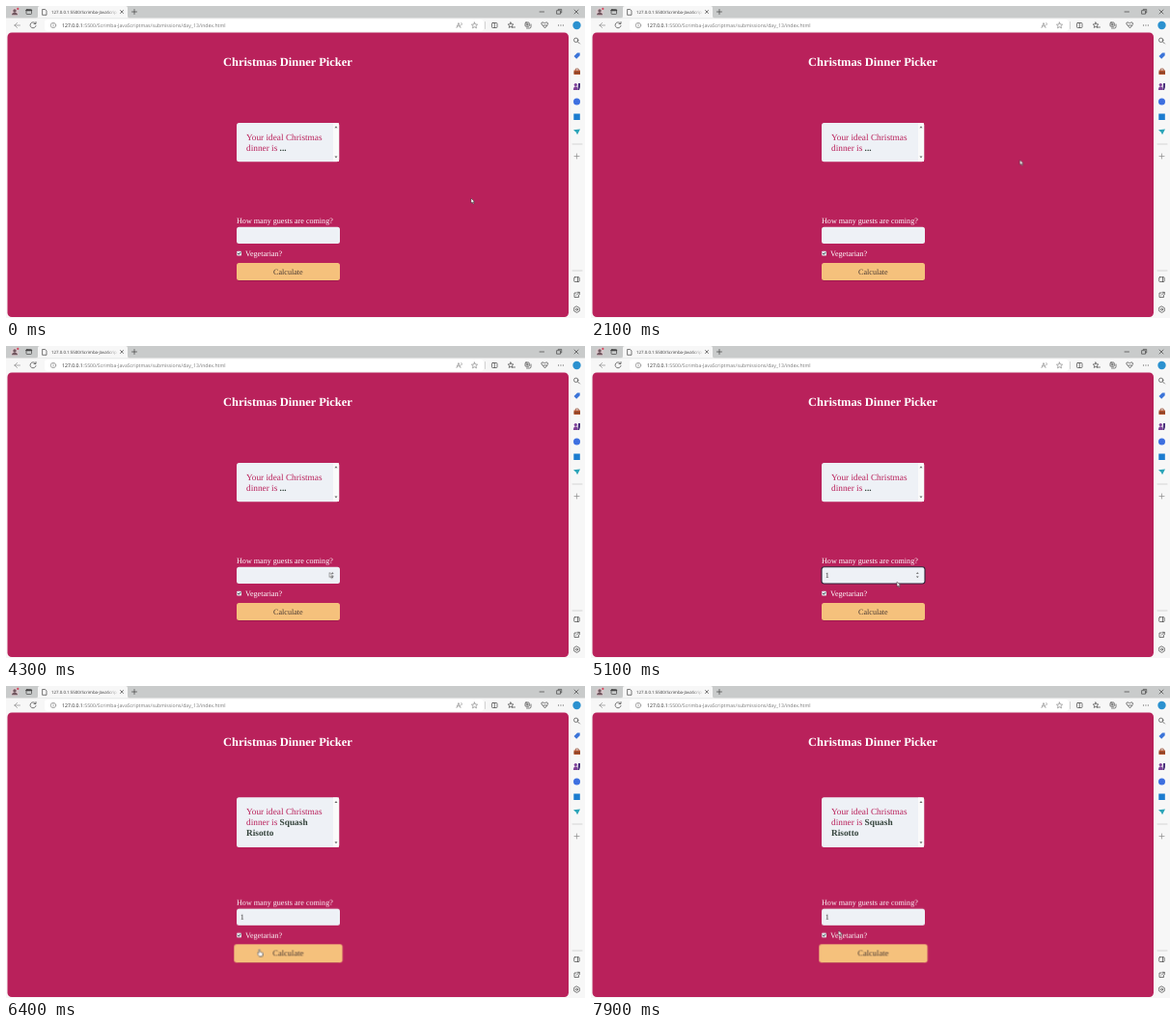
Write an HTML page that moves like this. It is 600 px wide and 323 px high and loops after 8000 ms.

```html
<!DOCTYPE html>
<html lang="en">
<head>
<meta charset="utf-8">
<title>Christmas Dinner Picker</title>
<style>
html, body { margin: 0; width: 100%; height: 100%; overflow: hidden; background: #f7f7f7; }
svg { display: block; width: 100vw; height: 100vh; text-rendering: geometricPrecision; }
.ui { font-family: "Open Sans", "Noto Sans", sans-serif; fill: #777; }
.serif { font-family: "Liberation Serif", "Times New Roman", serif; font-size: 8.1px; fill: #fff; }
.line { fill: none; stroke: #444; stroke-width: .7; stroke-linecap: round; stroke-linejoin: round; }
.soft { stroke: #8a8a8a; }
.pale { stroke: #c4c4c4; }
.answer { font-size: 9.3px; fill: #b9215b; }
.bold { font-weight: bold; fill: #34433b; }
.card { fill: #eef1f6; }
.anim { animation: 8s step-end infinite; }
.before { animation-name: before; }
.after { animation-name: after; }
.form { animation-name: form; }
.value { animation-name: value; }
.focus { animation-name: focus; }
.spin { animation-name: spin; }
.button { animation: hover 8s linear infinite; transform-box: fill-box; transform-origin: center; }
.pointer { animation: move 8s ease-in-out infinite; }
.arrow { animation-name: arrow; }
.hand { animation-name: hand; }
@keyframes before { 0% { opacity: 1 } 77.5%, 100% { opacity: 0 } }
@keyframes after { 0% { opacity: 0 } 77.5%, 100% { opacity: 1 } }
@keyframes form { 0% { transform: none } 77.5%, 100% { transform: translateY(1.8px) } }
@keyframes value { 0% { opacity: 0 } 58.75%, 100% { opacity: 1 } }
@keyframes focus { 0% { opacity: 0 } 58.75% { opacity: 1 } 77.5%, 100% { opacity: 0 } }
@keyframes spin { 0% { opacity: 0 } 47.5% { opacity: 1 } 77.5%, 100% { opacity: 0 } }
@keyframes hover { 0%, 66.25% { transform: scale(1) } 68.5%, 100% { transform: scale(1.05) } }
@keyframes arrow { 0% { opacity: 1 } 66.25% { opacity: 0 } 96.25%, 100% { opacity: 1 } }
@keyframes hand { 0% { opacity: 0 } 66.25% { opacity: 1 } 96.25%, 100% { opacity: 0 } }
@keyframes move {
  0% { transform: translate(482px, 199px) }
  15% { transform: translate(484px, 157px) }
  21% { transform: translate(484px, 157px) }
  37.5% { transform: translate(297.5px, 168px) }
  40% { transform: translate(297.5px, 168px) }
  50%, 61.25% { transform: translate(335.3px, 234.5px) }
  68.5%, 94% { transform: translate(262.5px, 272.5px) }
  98.5%, 100% { transform: translate(256.5px, 253px) }
}
</style>
</head>
<body>
<svg viewBox="0 0 600 323" preserveAspectRatio="none">
  <defs>
    <linearGradient id="fade" gradientUnits="userSpaceOnUse" x1="104" x2="116" y1="0" y2="0">
      <stop stop-color="#333"/><stop offset="1" stop-color="#333" stop-opacity="0.1"/>
    </linearGradient>
  </defs>

  <!-- browser frame -->
  <rect width="600" height="323" fill="#f7f7f7"/>
  <rect width="600" height="12.5" fill="#c9cbcb"/>
  <path d="M31 12.5q2 0 2-2V2q0-2 2-2H124q2 0 2 2v8.500q0 2 2 2z" fill="#f7f7f7"/>
  <rect x="40" y="14" width="455" height="12" rx="3" fill="#fff"/>
  <circle cx="9" cy="6.200" r="4.200" fill="#d9c9cd"/>
  <circle cx="9" cy="5" r="1.700" fill="#70565e"/>
  <path d="M6 9.300q0-2.500 3-2.500t3 2.500z" fill="#70565e"/>
  <circle cx="12.300" cy="2.900" r="1.100" fill="#d6455d"/>
  <g class="line">
    <rect x="21" y="3.500" width="5.500" height="5" rx=".8"/>
    <path d="M21 4.500h5.500" stroke-width="1.400"/>
    <path d="M38 3.500h2.600l1.400 1.400v4.400h-4z"/>
    <path d="M118.500 4.500l3 3m0-3l-3 3M130.500 6h5m-2.500-2.500v5"/>
    <path d="M553 6h4.500M571 4.700h3.500v3.500H571zM572.200 4v-.6h3.500V7h-.6M589 4l4 4m0-4l-4 4"/>
    <path d="M30.500 18a3 3 0 1 0 .5 2.500M31 16.500v2h-2"/>
    <path d="M9 20h5.500M9 20l2.500-2.500M9 20l2.500 2.500" class="soft"/>
    <path d="M572.500 20h.1m2.300 0h.1m2.300 0h.1" stroke-width="1"/>
  </g>
  <text class="ui" x="47" y="7.700" font-size="4.400" style="fill:url(#fade)">127.0.0.1:5500/Scrimba-JavaScrip</text>
  <g class="line soft">
    <circle cx="49" cy="20" r="2.700"/><path d="M49 19.700v1.500M49 18.500v.1"/>
    <path d="M485.500 17l.9 2 2.200.2-1.700 1.500.6 2.200-2-1.200-2 1.200.6-2.200-1.700-1.500 2.200-.2z"/>
    <path d="M467 22.500l2-5 2 5m-3.200-1.700h2.400M472 17.500q1 1 0 2.200"/>
    <path d="M496.500 16.500v7" class="pale"/>
  </g>
  <g class="line">
    <rect x="503.500" y="17.500" width="5.500" height="5" rx=".8"/><path d="M506.250 17.500v5"/>
    <path d="M523 17l.8 1.800 2 .2-1.500 1.400.5 2-1.800-1-1.800 1 .5-2-1.500-1.400 2-.2zM525 22h2.500"/>
    <rect x="538" y="17" width="4.300" height="4.300" rx="1"/><path d="M540.150 18v2.300M539 19.150h2.300M539.500 23h3q1.500 0 1.500-1.500V19"/>
    <path d="M560.500 20.500l-2 2.400-3.500-4q-.8-2 1.200-2 1.200 0 2 1.200.8-1.200 2-1.200 1.600 0 1.500 2M557 20h4"/>
  </g>
  <text class="ui" x="58" y="21.800" font-size="5.170"><tspan fill="#222">127.0.0.1</tspan>:5500/Scrimba-JavaScriptmas/submissions/day_13/index.html</text>

  <!-- side bar -->
  <circle cx="591.500" cy="20" r="4.200" fill="#2b91cf"/>
  <g class="line">
    <circle cx="590.700" cy="35.300" r="2.200"/><path d="M592.500 37l2 2"/>
  </g>
  <path d="M588.500 52l3.500-3.500h2.700v2.700l-3.500 3.500z" fill="#3b74d8"/>
  <path d="M588.500 66.500h6.500v4.500h-6.500z" fill="#b4532d"/>
  <path d="M590.300 66.500V65h2.900v1.500" class="line" style="stroke:#8d3b20"/>
  <path d="M588.500 69h6.500" stroke="#5e3025" stroke-width=".8"/>
  <circle cx="590.300" cy="81.500" r="1.600" fill="#7d3f98"/>
  <path d="M588 87q0-3.700 2.300-3.700t2.300 3.700z" fill="#7d3f98"/>
  <path d="M593 80h2v4l-1 3h-1.500z" fill="#4b327c"/>
  <circle cx="591.500" cy="99" r="3.500" fill="#3d6fe0"/>
  <rect x="588.300" y="111.500" width="6.500" height="6.500" fill="#1c7ccf"/>
  <path d="M588 128.300l7-.8-3 5.800-1.200-2.600z" fill="#2ba4b8"/>
  <path class="line pale" d="M587 143h10M587 274h10"/>
  <g class="line">
    <path d="M589 155.500h5m-2.500-2.500v5" class="soft"/>
    <rect x="588.700" y="280.700" width="5.500" height="4.800" rx=".8"/><path d="M592.500 280.700v4.800"/>
    <path d="M591 297h-2v4.500h4.500v-2M592 296.300h2.300v2.300M594 296.500l-2.800 2.800"/>
    <path d="M591.500 311l2.800 1.600v3.200l-2.800 1.600-2.800-1.600v-3.200z"/><circle cx="591.500" cy="314.200" r="1"/>
  </g>

  <!-- page -->
  <rect x="1.500" y="27.500" width="581.500" height="294.500" rx="4.500" fill="#b9215b"/>
  <g class="serif">
    <text x="292" y="62" text-anchor="middle" font-weight="bold" style="font-size:12.500px">Christmas Dinner Picker</text>

    <g class="anim before">
      <rect class="card" x="239" y="121" width="106.300" height="40.300" rx="2.500"/>
      <path d="M339 121.200h6v39.800h-6z" fill="#fafafa"/>
      <path d="M340.500 126.200l1.500-2 1.500 2zM340.500 155.500l1.500 2 1.500-2z" fill="#666"/>
      <text class="answer" x="249" y="138.700">Your ideal Christmas</text>
      <text class="answer" x="249" y="149.800">dinner is <tspan class="bold">...</tspan></text>
    </g>
    <g class="anim after">
      <rect class="card" x="239" y="115.300" width="106.300" height="51.700" rx="2.500"/>
      <path d="M339 115.500h6v51.200h-6z" fill="#fafafa"/>
      <path d="M340.500 121l1.500-2 1.500 2zM340.500 161.200l1.500 2 1.500-2z" fill="#666"/>
      <text class="answer" x="249" y="133.200">Your ideal Christmas</text>
      <text class="answer" x="249" y="144.200">dinner is <tspan class="bold">Squash</tspan></text>
      <text class="answer bold" x="249" y="155.200" style="fill:#34433b">Risotto</text>
    </g>

    <g class="anim form">
      <text x="239" y="225">How many guests are coming?</text>
      <rect class="card" x="239" y="228.700" width="107" height="17.300" rx="2.500"/>
      <rect class="anim focus" x="239" y="228.700" width="107" height="17.300" rx="2.500" fill="none" stroke="#30243a" stroke-width="1.100"/>
      <text class="anim value" x="242.800" y="240" style="fill:#333">1</text>
      <path class="anim spin" d="M336.900 235.800l1.400-1.600 1.400 1.600zM336.900 238.500l1.400 1.600 1.400-1.600z" fill="#555"/>
      <rect x="239.200" y="253.700" width="4.800" height="4.800" rx=".8" fill="#e6ebee"/>
      <path d="M240.200 256.100l1.100 1.100 1.900-2.200" class="line" style="stroke:#34404a;stroke-width:1"/>
      <text x="248" y="258.800">Vegetarian?</text>
      <rect x="239.500" y="267.500" width="106" height="17.500" rx="2.500" fill="#701338" opacity=".35"/>
      <g class="button">
        <rect x="239" y="266" width="107" height="18" rx="2.500" fill="#f5c17c"/>
        <text x="292.400" y="277.700" text-anchor="middle" style="fill:#4a3b35">Calculate</text>
      </g>
    </g>
  </g>

  <g class="pointer" stroke="#333" stroke-width=".5" stroke-linejoin="round" fill="#fff">
    <path class="anim arrow" d="M0 0v5l1.200-1 .9 2 .9-.4-.9-1.900h1.500z"/>
    <path class="anim hand" d="M-.6.600q.7-1 1.300 0v2.300l2.500.7q.7.300.5 1.200l-.6 2.400H-.2l-2-2.700q-.2-1 .7-.8l.9.700z"/>
  </g>
</svg>
</body>
</html>
```
